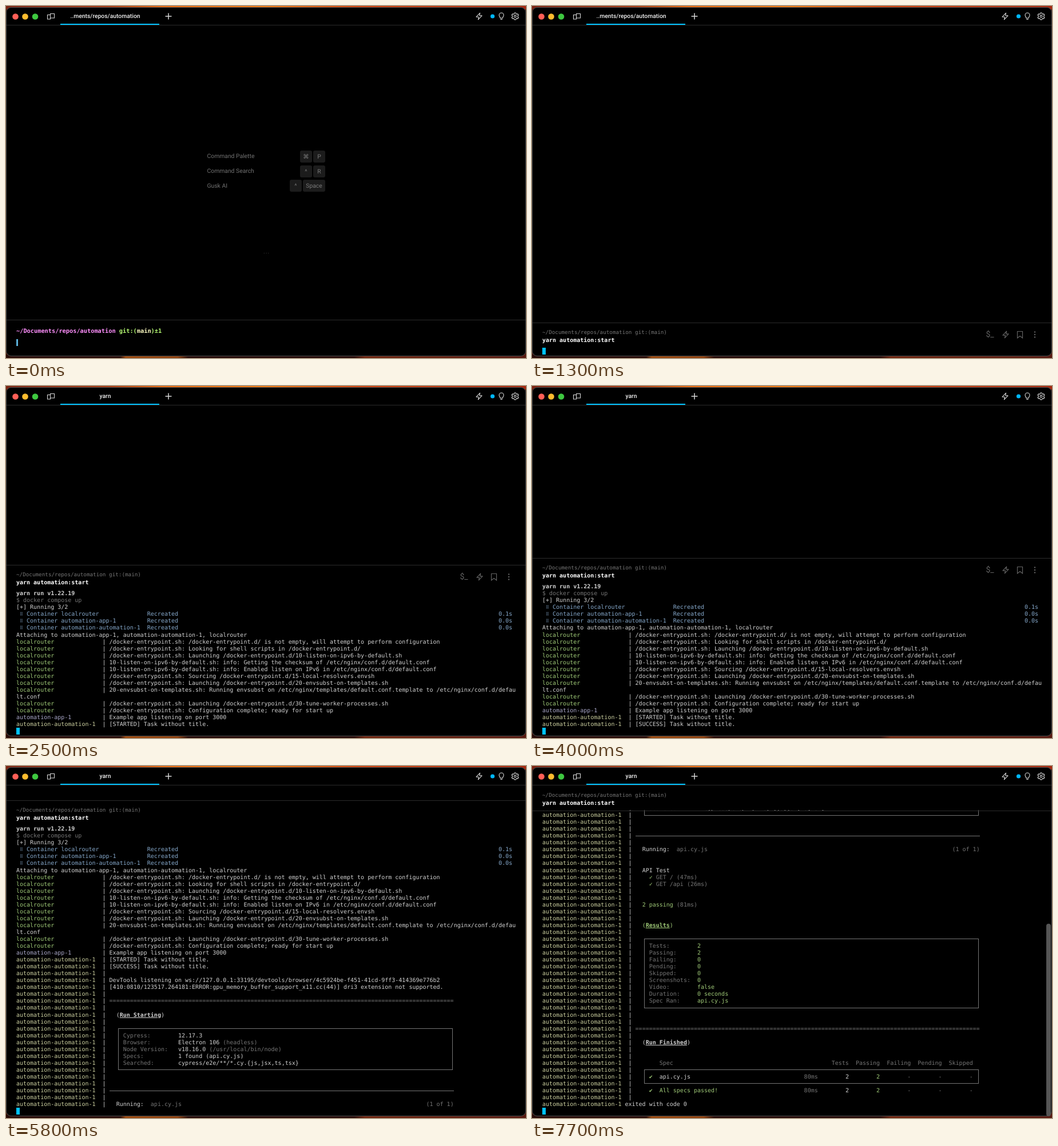
Animation, 909 px wide and 616 px high, one loop 9700 ms. Source, as an HTML page:

```html
<!DOCTYPE html>
<html lang="en">
<head>
<meta charset="utf-8">
<title>Terminal session</title>
<style>
  html, body { margin: 0; width: 100%; height: 100%; overflow: hidden; background: #1c0806; }
  #stage { position: relative; width: 909px; height: 616px; overflow: hidden; text-rendering: geometricPrecision;
    background: linear-gradient(90deg, #7c2412, #a83a12 20%, #e8690f 30%, #ef7a12 50%, #d0430f 68%, #a52a10) 0 0 / 100% 6px no-repeat,
      linear-gradient(90deg, #280b07 22%, #9a480d 23%, #8e3f0c 33%, #260a08 35%, #260a08 67%, #70240e 69%, #581910) 0 100% / 100% 6px no-repeat, #4a160b; }
  #stage * { box-sizing: border-box; }
  #stage div, #stage svg { position: absolute; }
  #window { left: 0; top: 2px; width: 909px; height: 611px; border: 1px solid #505050; border-radius: 9px; background: #000; }
  .mono { font: 10.007px/12.05px "DejaVu Sans Mono", monospace; white-space: pre; color: #d2d2d2; }
  .ui { font: 10.35px/12px Roboto, sans-serif; color: #727272; white-space: pre; }
  .line { left: 1px; width: 907px; height: 1px; background: #2b2b2b; }
  .bold, .u { font-weight: bold; }
  .u { text-decoration: underline; }
  .d { color: #757575; }
  .g { color: #a0cb78; }
  .y { color: #cbcf9f; }
  .b { color: #86a9cc; }
  .p { color: #a9a7c8; }
  .mark { display: inline-block; width: 6.024px; height: 12px; vertical-align: top; }
  .dots { font-size: 8px; }

  #tab { left: 95px; top: 31px; width: 173px; height: 2px; background: #00c2ff; }
  #title { left: 95px; top: 12px; width: 157px; text-align: center; color: #f0f0f0; font-weight: 500; }
  .key { height: 21px; line-height: 21px; text-align: center; background: #1c1c1c; border-radius: 3px; color: #7a7a7a; }

  #menu { left: 11px; top: 401px; width: 888px; height: 148px; background: #232323; border: 1px solid #444; border-bottom: 0; border-radius: 4px 4px 0 0; }
  #menu .mono { left: 0; width: 875px; height: 22.5px; padding-left: 5.5px; font-size: 9.43px; line-height: 22.5px; color: #b0b0b0; }
  #menu .mono.on { background: #00c2ff; color: #0c5b78; }
  #menu .thumb { left: 877px; top: 125px; width: 7px; height: 18px; border-radius: 4px; background: #6b6b6b; }

  #prompt .mono { left: 18px; font-size: 10.3px; }
  #caret { top: 583px; width: 2.5px; height: 12px; }

  #view { left: 0; bottom: 3px; width: 909px; overflow: hidden; }
  #out { left: 18px; bottom: 2.8px; }
  #out p { position: relative; margin: 0; height: 12.05px; line-height: 13px; }
  #out i { position: absolute; top: 5.5px; margin-left: .5ch; width: calc(97ch + 1px); height: calc(var(--rows) * 12.05px + 1px); border: 1px solid #757575; }
  #out i.rule { width: 100ch; margin: 0; height: 1px; border-width: 1px 0 0; }
  #cursor { display: inline-block; width: 6px; height: 12px; background: #00c2ff; vertical-align: top; }
  #head { left: 0; width: 909px; height: 44px; }
  #scroll { left: 899px; width: 8px; bottom: 3px; border-radius: 4px; background: #555; }
</style>
</head>
<body>
<div id="stage">
  <div id="window"></div>

  <div id="view"><div id="out" class="mono"></div></div>
  <div id="head">
    <div class="line" id="edge"></div>
    <div class="mono d" style="left:18px;top:12px;font-size:9.29px">~/Documents/repos/automation git:(main)</div>
    <div class="mono bold" style="left:18px;top:26px;color:#fff">yarn automation:start</div>
    <svg id="tools" width="110" height="24" style="left:785px;top:9px" fill="none" stroke="#626262" stroke-width="1.2">
      <text x="8.5" y="16" font-family="Roboto, sans-serif" font-size="14" fill="#626262" stroke="none">$_</text>
      <use href="#bolt" x="43" y="12"/>
      <path d="M63.5 6.5h9v11.5l-4.5-3.5-4.5 3.5z"/>
      <path d="M94 7.5v.1M94 12v.1M94 16.5v.1" stroke-width="2.4" stroke-linecap="round"/>
    </svg>
  </div>
  <div id="scroll"></div>

  <div class="line" style="top:33px"></div>
  <div id="tab"></div>
  <div id="title" class="ui"></div>
  <svg width="909" height="34" style="left:0;top:0" fill="none" stroke="#d8d8d8" stroke-width="1.1">
    <defs><path id="bolt" d="M1.6-5.8-5 1.2H-.6L-1.6 5.8 5-1.2H.6Z" stroke-linejoin="round"/></defs>
    <g stroke="none">
      <circle cx="16.5" cy="18.5" r="5.3" fill="#ff5f57"/>
      <circle cx="33.5" cy="18.5" r="5.3" fill="#febc2e"/>
      <circle cx="51" cy="18.5" r="5.3" fill="#3ec840"/>
      <circle cx="850.5" cy="18" r="3.6" fill="#00b7ff"/>
    </g>
    <path d="M77.5 15.5h-5v7.5h5zM77.5 13.5h7v7.5h-7z"/>
    <path d="M284 12.5v11M278.5 18h11" stroke-width="1.5"/>
    <use href="#bolt" x="827" y="18"/>
    <path transform="translate(866 18)" d="M-2 3.2C-2 1.5-4 .5-4-2A4 4 0 0 1 4-2C4 .5 2 1.5 2 3.2ZM-1.8 5.4H1.8"/>
    <g transform="translate(890 18)">
      <path d="M-1.2-6h2.4l.5 1.7 1.2.7 1.8-.5 1.2 2.1-1.3 1.3v1.4l1.3 1.3-1.2 2.1-1.8-.5-1.2.7-.5 1.7h-2.4l-.5-1.7-1.2-.7-1.8.5-1.2-2.1 1.3-1.3v-1.4l-1.3-1.3 1.2-2.1 1.8.5 1.2-.7z"/>
      <circle r="1.9"/>
    </g>
  </svg>

  <div id="hints"></div>
  <div id="menu"></div>
  <div id="prompt">
    <div class="line" style="top:549px"></div>
    <div class="mono bold" style="top:562.5px;color:#b4fa72"><span style="color:#ff8ffd">~/Documents/repos/automation</span> git:(<span style="color:#fefdc2">main</span>)±1</div>
    <div id="typed" class="mono" style="top:583.5px;color:#c9cbf0"><span style="color:#bfe58c">yarn</span> automation:start</div>
    <div id="caret"></div>
  </div>
</div>

<script>
const $ = id => document.getElementById(id);
const LOOP = 9700, ROW = 12.05;

// Each part is [column, text, class].
function row(...parts) {
  let at = 0, html = '';
  for (const [col, text, cls = ''] of parts) {
    html += ' '.repeat(Math.max(0, col - at)) + `<span class="${cls}">${text}</span>`;
    at = col + text.length;
  }
  return html;
}
const container = (name, time) =>
  row([1, '⠿', 'b mark dots'], [3, 'Container ' + name, 'b'], [38, 'Recreated', 'b'], [140, time, 'b']);
const router = text => row([0, 'localrouter', 'g'], [25, '|'], [27, text]);
const job = (...parts) => row([0, 'automation-automation-1', 'y'], [25, '|'], ...parts);
const blank = count => Array(count).fill(job());
const frame = rows => job([29, `<i style="--rows:${rows}"></i>`]);
const rule = job([27, '<i class="rule"></i>']);
const doubleRule = job([27, '='.repeat(100), 'd']);
const heading = (text, cls = '') => job([29, '(', cls], [30, text, 'u ' + cls], [30 + text.length, ')', cls]);
const fact = (label, value, note = '') =>
  job([31, label + ':', 'd'], [47, value], [48 + value.length, note, 'd']);
const result = (label, value) => job([31, label + ':', 'd'], [45, value, 'g']);
const test = text => job([31, '✓', 'g mark'], [33, text, 'd']);
const spec = (name, cls) => job([31, '✔', 'g mark'], [34, name, cls], [76, '80ms', 'd'], [88, '2'], [97, '2', 'g'],
  ...[106, 115, 124].map(col => [col, '-', 'd']));

const entry = '/docker-entrypoint.sh: ';
const lines = [
  row([0, 'yarn run v1.22.19', 'bold']),
  row([0, '$ docker compose up', 'd']),
  '[+] Running 3/2',
  container('localrouter', '0.1s'),
  container('automation-app-1', '0.0s'),
  container('automation-automation-1', '0.0s'),
  'Attaching to automation-app-1, automation-automation-1, localrouter',
  router(entry + '/docker-entrypoint.d/ is not empty, will attempt to perform configuration'),
  router(entry + 'Looking for shell scripts in /docker-entrypoint.d/'),
  router(entry + 'Launching /docker-entrypoint.d/10-listen-on-ipv6-by-default.sh'),
  router('10-listen-on-ipv6-by-default.sh: info: Getting the checksum of /etc/nginx/conf.d/default.conf'),
  router('10-listen-on-ipv6-by-default.sh: info: Enabled listen on IPv6 in /etc/nginx/conf.d/default.conf'),
  router(entry + 'Sourcing /docker-entrypoint.d/15-local-resolvers.envsh'),
  router(entry + 'Launching /docker-entrypoint.d/20-envsubst-on-templates.sh'),
  router('20-envsubst-on-templates.sh: Running envsubst on /etc/nginx/templates/default.conf.template to /etc/nginx/conf.d/defau'),
  'lt.conf',
  router(entry + 'Launching /docker-entrypoint.d/30-tune-worker-processes.sh'),
  router(entry + 'Configuration complete; ready for start up'),
  row([0, 'automation-app-1', 'p'], [25, '|'], [27, 'Example app listening on port 3000']),
  job([27, '[STARTED] Task without title.']),
  job([27, '[SUCCESS] Task without title.']),
  job(),
  job([27, 'DevTools listening on ws://127.0.0.1:33195/devtools/browser/4c5924be-f451-41cd-9ff3-414369e776b2']),
  job([27, '[410:0810/123517.264181:ERROR:gpu_memory_buffer_support_x11.cc(44)] dri3 extension not supported.']),
  job(), doubleRule, job(),
  heading('Run Starting'),
  job(), frame(6),
  fact('Cypress', '12.17.3'),
  fact('Browser', 'Electron 106', '(headless)'),
  fact('Node Version', 'v18.16.0', '(/usr/local/bin/node)'),
  fact('Specs', '1 found (api.cy.js)'),
  fact('Searched', 'cypress/e2e/**/*.cy.{js,jsx,ts,tsx}'),
  ...blank(3), rule, job(),
  job([29, 'Running:'], [39, 'api.cy.js', 'd'], [119, '(1 of 1)', 'd']),
  ...blank(2),
  job([29, 'API Test']),
  test('GET / (47ms)'),
  test('GET /api (26ms)'),
  ...blank(2),
  job([29, '2 passing', 'g'], [39, '(81ms)', 'd']),
  ...blank(2),
  heading('Results', 'g'),
  job(), frame(10),
  result('Tests', '2'),
  result('Passing', '2'),
  result('Failing', '0'),
  result('Pending', '0'),
  result('Skipped', '0'),
  result('Screenshots', '0'),
  result('Video', 'false'),
  result('Duration', '0 seconds'),
  result('Spec Ran', 'api.cy.js'),
  ...blank(3), doubleRule, job(),
  heading('Run Finished'),
  ...blank(2),
  job([34, 'Spec', 'd'], [84, 'Tests', 'd'], [91, 'Passing', 'd'], [100, 'Failing', 'd'], [109, 'Pending', 'd'], [118, 'Skipped', 'd']),
  frame(2),
  spec('api.cy.js'),
  job(),
  spec('All specs passed!', 'g'),
  job(),
  row([0, 'automation-automation-1', 'y'], [24, 'exited with code 0'])
];

// [time, rows on screen including the cursor row]
const growth = [[0, 0], [1300, 1], [1400, 3], [1700, 7], [1900, 8], [2000, 10], [2100, 15], [2200, 20], [2500, 21],
  [4000, 22], [4600, 24], [4700, 25], [5600, 38], [5700, 40], [5800, 42], [6900, 50], [7000, 66], [7500, 70], [7600, 78], [7700, 79]];

const key = (x, y, width, text) => `<div class="ui key" style="left:${x}px;top:${y}px;width:${width}px">${text}</div>`;
const hint = (y, text) => `<div class="ui" style="left:351.5px;top:${y}px">${text}</div>`;
$('hints').innerHTML = hint(257, 'Command Palette') + hint(283, 'Command Search') + hint(309, 'Gusk AI') +
  key(514, 253, 21, '<span style="font-family:DejaVu Sans,sans-serif">⌘</span>') + key(537, 253, 21, 'P') +
  key(514, 278.5, 21, '^') + key(537, 278.5, 21, 'R') + key(496, 304, 21, '^') + key(519, 304, 39, 'Space') +
  '<div class="ui" style="left:450px;top:424px;color:#444;letter-spacing:1px">...</div>';

$('menu').innerHTML = ["git commit -m 'FINALLY'", 'git status', 'git push', 'rm -rf node_modules/',
  'yarn automation:cleanup', 'yarn automation:start'].map((text, i) =>
  `<div class="mono ${i === 5 ? 'on' : ''}" style="top:${8.5 + i * 22.2}px">${text}</div>`).join('') + '<div class="thumb"></div>';

const show = (id, on) => $(id).style.display = on ? '' : 'none';
let shownRows = -1;

function drawOutput(rows) {
  if (rows === shownRows) return;
  shownRows = rows;
  const top = Math.floor(610.2 - rows * ROW - 43.5);
  const sticky = top < 33;
  show('view', rows);
  show('head', rows);
  show('scroll', sticky);
  $('out').innerHTML = lines.slice(0, Math.max(0, rows - 1)).map(html => `<p>${html}</p>`).join('') + '<p><span id="cursor"></span></p>';
  $('view').style.top = (sticky ? 77 : 34) + 'px';
  $('head').style.top = (sticky ? 34 : top) + 'px';
  $('edge').style.top = (sticky ? 44 : 0) + 'px';
  $('scroll').style.height = 580 * 580 / (rows * ROW + 47) + 'px';
}

function draw(now) {
  const t = now % LOOP;
  const picked = t >= 500 && t < 1100;
  $('title').textContent = t < 1700 ? '..ments/repos/automation' : 'yarn';
  show('hints', t < 1100);
  show('menu', picked);
  show('typed', picked);
  show('prompt', t < 1300);
  $('caret').style.left = (picked ? 148.5 : 18) + 'px';
  $('caret').style.background = picked ? '#00c2ff' : '#5cb2dc';
  $('tools').style.opacity = t < 4300 ? 1 : t < 4400 ? .5 : 0;
  drawOutput(growth.findLast(([time]) => t >= time)[1]);
}

const start = performance.now();
function tick() {
  draw(performance.now() - start);
  requestAnimationFrame(tick);
}
tick();
</script>
</body>
</html>
```
